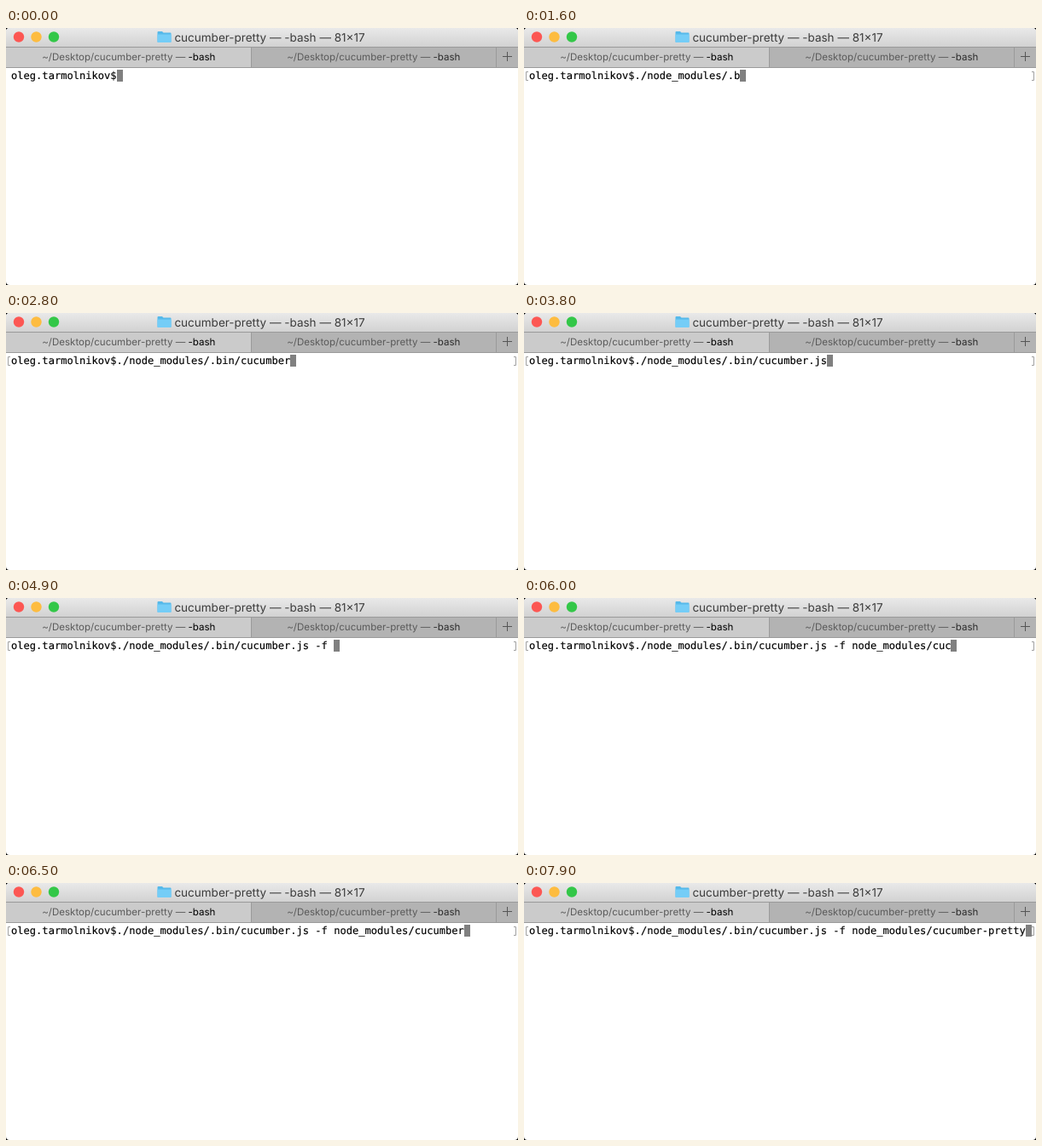
An HTML page that plays this animation: 600 by 302 pixels, repeating every 8 s.

```html
<!DOCTYPE html>
<html lang="en">
<head>
<meta charset="utf-8">
<title>Terminal session</title>
<style>
  html, body { margin: 0; width: 100%; height: 100%; overflow: hidden; background: #000; }
  svg { display: block; width: 600px; height: 302px; border-radius: 4px; }
  text { white-space: pre; text-rendering: geometricPrecision; }
  .ui { font-family: Inter, Roboto, sans-serif; text-anchor: middle; }
  .title { font-size: 13.5px; fill: #3b3b3b; }
  .tab { font-size: 11.56px; fill: #5a5a5a; }
  .mono { font: 12.08px "DejaVu Sans Mono", "Liberation Mono", monospace; }
  #line { fill: #000; stroke: #000; stroke-width: .15px; }
  .flash #line { stroke: none; }
  #screen { fill: #fff; }
  .flash #screen { fill: #e6e6e6; }
  #cursor { fill: #808080; }
  .flash #cursor { fill: #8a8a8a; }
  #marks { fill: none; stroke: #a0a0a0; }
</style>
</head>
<body>
<svg id="stage" viewBox="0 0 600 302">
  <defs>
    <linearGradient id="bar" x2="0" y2="1">
      <stop stop-color="#e9e9e9"/>
      <stop offset="1" stop-color="#d2d2d2"/>
    </linearGradient>
  </defs>

  <rect id="screen" width="600" height="302"/>

  <!-- Title bar -->
  <rect width="600" height="22" fill="url(#bar)"/>
  <circle cx="15" cy="10.5" r="6.2" fill="#fc5753"/>
  <circle cx="35.5" cy="10.5" r="6.2" fill="#fdbc40"/>
  <circle cx="56" cy="10.5" r="6.2" fill="#33c748"/>
  <path d="M177.500 5q0-1 1-1h4.500l1.500 1.500h8q1 0 1 1v9.500q0 1-1 1h-14q-1 0-1-1z" fill="#56b9ea"/>
  <path d="M177.500 7.500h16v8.500q0 1-1 1h-14q-1 0-1-1z" fill="#74cdf7"/>
  <text class="ui title" x="309" y="15.500">cucumber-pretty — -bash — 81×17</text>

  <!-- Tabs -->
  <rect y="22" width="600" height="25" fill="#b3b3b3"/>
  <rect y="23" width="287" height="23" fill="#cbcbcb"/>
  <path d="M0 22.500H600M0 46.500H600M287.500 23V46M574.500 23V46" stroke="#9a9a9a"/>
  <text class="ui tab" x="143.800" y="38">~/Desktop/cucumber-pretty — <tspan fill="#000">-bash</tspan></text>
  <text class="ui tab" x="430.800" y="38">~/Desktop/cucumber-pretty — <tspan fill="#2c2c2c">-bash</tspan></text>
  <path d="M582 33.500H593M587.500 28V39" stroke="#555"/>

  <!-- Shell -->
  <path id="marks" d="M5 51.500H2.500V61.500H5M595 51.500H597.500V61.500H595"/>
  <rect id="cursor" y="49" width="7" height="14"/>
  <text id="line" class="mono" x="6" y="60"></text>
</svg>
<script>
  const LOOP = 8000;
  const KEY = 120;         // ms between keystrokes
  const BELL_DELAY = 80;
  const BELL_LENGTH = 300;
  const LEFT = 6;
  const ADVANCE = 7.272;
  const PROMPT = 'oleg.tarmolnikov$';

  // Each burst of typing may end with a tab that fills in the rest of a word.
  const BURSTS = [
    { at: 500, keys: './node', tab: '_modules/' },
    { at: 1400, keys: '.b', tab: 'in/' },
    { at: 2060, keys: 'cuc', tab: 'umber' },
    { at: 3100, keys: '.js' },
    { at: 4160, keys: ' -f ' },
    { at: 4910, keys: 'node', tab: '_modules/' },
    { at: 5760, keys: 'cuc', tab: 'umber' },
    { at: 6900, keys: '-pretty' }
  ];

  const byId = id => document.getElementById(id);
  const stage = byId('stage'), line = byId('line');
  const cursor = byId('cursor'), marks = byId('marks');

  function stateAt(t) {
    let command = '', flash = false;
    for (const { at, keys, tab = '' } of BURSTS) {
      if (t < at) break;
      command += keys.slice(0, Math.floor((t - at) / KEY) + 1);
      const sinceTab = t - at - keys.length * KEY;
      if (sinceTab >= 0) command += tab;

      // An ambiguous completion, one that stops short of a folder, rings the bell.
      const sinceBell = sinceTab - BELL_DELAY;
      if (tab && !tab.endsWith('/') && sinceBell >= 0 && sinceBell < BELL_LENGTH) flash = true;
    }
    return { command, flash };
  }

  function draw(t) {
    const { command, flash } = stateAt(t);
    const text = PROMPT + command;
    if (line.textContent !== text) line.textContent = text;
    cursor.setAttribute('x', Math.round(LEFT + text.length * ADVANCE));
    marks.style.visibility = command ? 'visible' : 'hidden';
    stage.classList.toggle('flash', flash);
  }

  const start = performance.now();
  function tick() {
    draw((performance.now() - start) % LOOP);
    requestAnimationFrame(tick);
  }
  tick();
</script>
</body>
</html>
```
